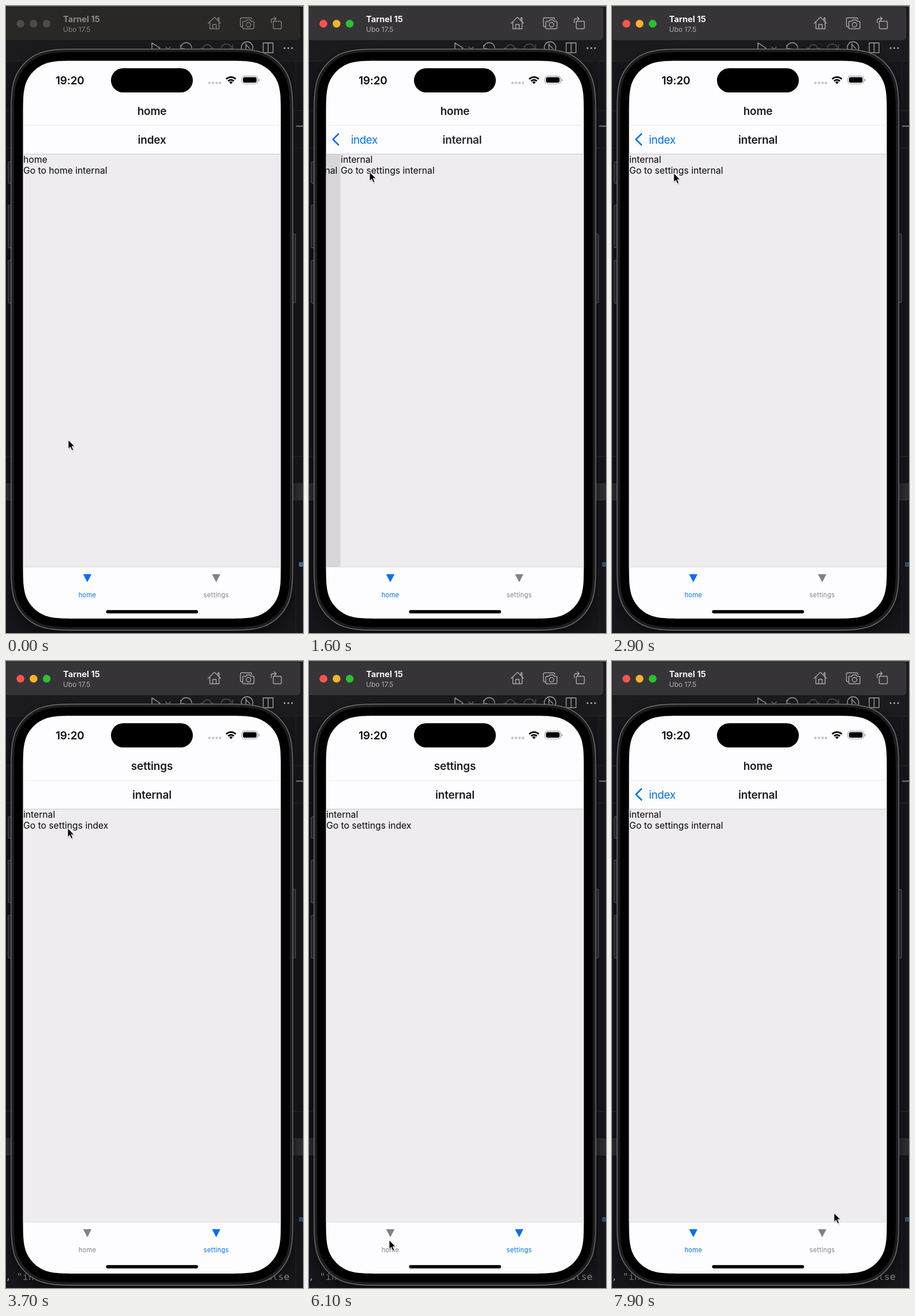
Write an HTML page that moves like this. It is 515 px wide and 1088 px high and loops after 8 s.

```html
<!DOCTYPE html>
<html lang="en">
<head>
<meta charset="utf-8">
<title>Nested tab navigation</title>
<style>
  html, body { margin: 0; width: 100%; height: 100%; overflow: hidden; background: #151417; }
  svg { display: block; width: 515px; height: 1088px; font-family: Inter, "Noto Sans", sans-serif; }
  .line { fill: none; stroke-width: 1.4; stroke-linejoin: round; stroke-linecap: round; }
  .heading { font-size: 19px; font-weight: 600; letter-spacing: -.2px; text-anchor: middle; fill: #1c1b1e; }
  .body { font-size: 15.7px; fill: #050505; }
  .tab { font-size: 11.2px; letter-spacing: .25px; text-anchor: middle; }
  .code { font: 16.5px "DejaVu Sans Mono", monospace; fill: #96949a; white-space: pre; }
</style>
</head>
<body>
<svg viewBox="0 0 515 1088">
  <defs>
    <clipPath id="screen"><path id="glass"/></clipPath>
    <clipPath id="content"><rect x="29.5" y="257" width="447" height="716"/></clipPath>
    <filter id="blur" x="-20%" y="-20%" width="140%" height="140%"><feGaussianBlur stdDeviation="12"/></filter>
  </defs>

  <!-- editor behind the phone -->
  <rect width="515" height="1088" fill="#17161a"/>
  <rect width="515" height="95" fill="#1b1a1d"/>
  <path d="M0 95.5H515M0 181.5H515M0 246.5H515M0 781.5H515" stroke="#29282b"/>
  <rect y="828" width="515" height="30" fill="#2f2e31"/>
  <path d="M502 208.5H515" stroke="#858488" stroke-width="2"/>
  <path d="M502.5 95V1088" stroke="#222124"/>
  <rect id="marker" x="508" y="965" width="7" height="8"/>
  <g id="log" class="code"><text x="-1" y="1074">, "in</text><text x="442" y="1074">false</text></g>
  <g class="line" stroke="#a3a1a5">
    <path d="M253 64V82L267 73Z M446 64H463V81H446Z M454.5 64V81"/>
    <path d="M277 71L281 75L285 71" stroke="#757377"/>
    <path d="M303 68V74H309 M303 73A9.5 9.5 0 0 1 322 73"/>
    <g stroke="#545256"><circle cx="349" cy="74" r="7"/><path d="M338 73H342M356 73H360 M373 73A9.5 9.5 0 0 1 391 72M393 67V74H387"/></g>
    <circle cx="418" cy="72" r="10"/><path d="M416 65V79M416 67L423 74"/>
  </g>
  <g fill="#b5b3b7"><circle cx="483" cy="73" r="1.5"/><circle cx="489.5" cy="73" r="1.5"/><circle cx="496" cy="73" r="1.5"/></g>
  <path id="shadow" opacity=".5" filter="url(#blur)"/>

  <!-- simulator title bar -->
  <path d="M0 0H515" stroke="#777476" stroke-width="2"/>
  <path id="bar" d="M0 1H505Q511 1 511 8V52Q511 60 503 60H0Z" stroke="#0f0e10" stroke-width=".7"/>
  <g id="lights"><circle cx="25" cy="30.7" r="6.8"/><circle cx="47.8" cy="30.7" r="6.8"/><circle cx="70.5" cy="30.7" r="6.8"/></g>
  <text id="device" x="99" y="28" font-size="14.6" font-weight="700">Tarnel 15</text>
  <text id="system" x="99" y="45" font-size="12">Ubo 17.5</text>
  <g id="barIcons" class="line">
    <path d="M350.5 30L361.5 19.5L372 30M353.5 27.5V39.5H369.5V27.5M367.5 25V20.5H369.5V27M358.5 39V32H364.5V39"/>
    <path d="M410 36H408.5Q406.5 36 406.5 34V22.5Q406.5 20.5 408.5 20.5H424Q426 20.5 426 23"/>
    <path d="M412 26.5H416L418 24H423L425 26.5H428Q430 26.5 430 28.5V37.5Q430 39.5 428 39.5H412.5Q410.5 39.5 410.5 37.5V28.5Q410.5 26.5 412 26.5Z"/>
    <circle cx="420.5" cy="32.5" r="4"/>
    <path d="M463.5 26.5H476Q477.5 26.5 477.5 28V38Q477.5 39.5 476 39.5H465Q463.5 39.5 463.5 38Z M460 29V25Q460 22 463 22H468M465.5 19L468.5 22L465.5 25"/>
  </g>

  <!-- phone body -->
  <g fill="#222124" stroke="#59585b">
    <rect x="4" y="270.5" width="8" height="37" rx="1"/>
    <rect x="4" y="345.5" width="8" height="74" rx="1"/>
    <rect x="4" y="441.5" width="8" height="74" rx="1"/>
    <rect x="493" y="396" width="9" height="119" rx="1"/>
  </g>
  <path id="shell" fill="#1d1c1f" stroke="#737276" stroke-width="1.4"/>
  <path id="bezel"/>

  <g clip-path="url(#screen)">
    <rect x="29" y="95" width="448" height="969" fill="#fdfcfe"/>
    <g clip-path="url(#content)">
      <g id="under" class="body">
        <rect x="29.5" y="257" width="447" height="716" fill="#eeecef"/>
        <text x="30" y="272">home</text><text x="30" y="291">Go to home internal</text>
      </g>
      <rect id="dim" x="29.5" y="257" width="447" height="716"/>
      <g id="over" class="body">
        <rect x="29.5" y="257" width="447" height="716" fill="#eeecef"/>
        <text x="30" y="272">internal</text><text id="link" x="30" y="291"></text>
      </g>
    </g>
    <path d="M29 207H477" stroke="#ebeaec"/>
    <path d="M29 257H477" stroke="#c5c4c7"/>
    <path d="M29 973.5H477" stroke="#dad9dc"/>

    <text id="tabTitle" class="heading" x="253" y="188.5"></text>
    <text id="oldTitle" class="heading" y="238.5">index</text>
    <text id="newTitle" class="heading" y="238.5">internal</text>
    <g id="back" fill="#0070f2">
      <path d="M51 222L41.5 231.5L51 241" fill="none" stroke="#0070f2" stroke-width="2.6" stroke-linecap="round" stroke-linejoin="round"/>
      <text id="backLabel" y="238.5" font-size="18.7" letter-spacing="-.3">index</text>
    </g>

    <!-- status bar -->
    <text x="86" y="135.5" font-size="19" font-weight="600" letter-spacing="-.2" fill="#0a0a0a">19:20</text>
    <rect x="182" y="108" width="142" height="42" rx="21"/>
    <g fill="#c6c5c8"><circle cx="352.7" cy="133.5" r="2.2"/><circle cx="358.9" cy="133.5" r="2.2"/><circle cx="365.1" cy="133.5" r="2.2"/><circle cx="371.2" cy="133.5" r="2.2"/></g>
    <g fill="none" stroke="#000" stroke-width="2.8"><path d="M381.8 126.7A11.8 11.8 0 0 1 398.4 126.7M385 130.3A7.2 7.2 0 0 1 395.2 130.3"/></g>
    <path d="M390.1 135.5L387 132.2A4.5 4.5 0 0 1 393.2 132.2Z"/>
    <rect x="409" y="121.5" width="27.5" height="13.5" rx="4.5" fill="none" stroke="#9c9b9e" stroke-width="1.2"/>
    <rect x="411" y="123.5" width="23.5" height="9.5" rx="2.7"/>
    <path d="M438 126V131Q439.8 130 439.8 128.5Q439.8 127 438 126Z" fill="#9c9b9e"/>

    <!-- tab bar -->
    <g id="homeTab" class="tab"><path d="M133.8 986H148.2L141 1000Z"/><text x="141" y="1025.5">home</text></g>
    <g id="settingsTab" class="tab"><path d="M357.3 986H371.7L364.5 1000Z"/><text x="364.5" y="1025.5">settings</text></g>
    <rect x="173.5" y="1048.3" width="159.5" height="5.6" rx="2.8"/>
  </g>

  <g id="cursor">
    <g transform="scale(.9)">
      <path d="M1 2V19.5L5 16L8 22.5L11 21.2L8.2 14.5H13.5Z" opacity=".16"/>
      <path d="M0 0V17.2L4 13.5L6.9 20.3L9.8 19L6.9 12.3H12.3Z" stroke="#fff" stroke-linejoin="round"/>
    </g>
  </g>
</svg>

<script>
const LOOP = 8000, STEP = 100;
const ACTIVATE = 1100, PUSH = 1350, TO_SETTINGS = 3100, TO_HOME = 6600;
const WIDTH = 446, CENTER = 253;

// Pointer stops: [time, x, y]
const STOPS = [
  [0, 108, 753], [1000, 105, 288], [2700, 105, 288], [2900, 107, 290], [4100, 107, 290],
  [4500, 197, 455], [4900, 313, 892], [5300, 386, 1005], [5400, 386, 1005],
  [6100, 139, 1005], [6300, 139, 1005], [6400, 138, 1004], [7500, 138, 1004], [7900, 385, 958], [8000, 385, 958],
];

const el = {};
for (const node of document.querySelectorAll("[id]")) el[node.id] = node;
const set = (id, attrs) => { for (const name in attrs) el[id].setAttribute(name, attrs[name]); };

// Rectangle whose corners have continuous curvature
function smoothRect(left, top, right, bottom, radius) {
  const corner = (x, y, sx, sy, swap) => {
    const points = [[1.529, 0], [1.088, 0], [.868, 0], [.631, .075], [.373, .169], [.169, .373], [.075, .631], [0, .868], [0, 1.088], [0, 1.529]];
    if (swap) points.reverse();
    const [start, ...curve] = points.map(([u, v]) => `${x + sx * u * radius} ${y + sy * v * radius}`);
    return `L${start}C${curve.join(" ")}`;
  };
  const outline = corner(right, top, -1, 1) + corner(right, bottom, -1, -1, true)
    + corner(left, bottom, 1, -1) + corner(left, top, 1, 1, true);
  return "M" + outline.slice(1) + "Z";
}

// Zero at the ends of a rest, otherwise the slope between the neighbours
function slope(i, axis) {
  const before = STOPS[i - 1], here = STOPS[i], after = STOPS[i + 1];
  if (!before || !after || before[axis] === here[axis] || after[axis] === here[axis]) return 0;
  return (after[axis] - before[axis]) / (after[0] - before[0]);
}

function pointer(t, axis) {
  const i = STOPS.findIndex((stop, k) => t < STOPS[k + 1][0]);
  const a = STOPS[i], b = STOPS[i + 1], span = b[0] - a[0];
  const u = (t - a[0]) / span, v = 1 - u;
  return a[axis] * v * v * (1 + 2 * u) + b[axis] * u * u * (1 + 2 * v)
    + span * u * v * (slope(i, axis) * v - slope(i + 1, axis) * u);
}

// Remaining part of the push: a critically damped spring
function remaining(t) {
  if (t < PUSH) return 1;
  const x = 18.4 * (t - PUSH) / 1000;
  return x > 9 ? 0 : (1 + x) * Math.exp(-x);
}

function drawTitleBar(active) {
  set("bar", { fill: active ? "#363437" : "#292826" });
  set("device", { fill: active ? "#f5f4f5" : "#8b8988" });
  set("system", { fill: active ? "#b0aeb1" : "#858382" });
  set("barIcons", { stroke: active ? "#aaa8ab" : "#807e7d" });
  ["#fe544d", "#f8b32c", "#28c131"].forEach((color, i) =>
    el.lights.children[i].setAttribute("fill", active ? color : "#4c4b49"));
  set("marker", { fill: active ? "#23586d" : "#3d77a8" });
}

function drawApp(t) {
  const settings = t >= TO_SETTINGS && t < TO_HOME;
  const rest = settings ? 0 : remaining(t), done = 1 - rest;

  set("under", { transform: `translate(${-0.3 * WIDTH * done} 0)` });
  set("dim", { opacity: 0.1 * done });
  set("over", { transform: `translate(${WIDTH * rest} 0)`, visibility: rest < 1 ? "visible" : "hidden" });
  el.link.textContent = settings ? "Go to settings index" : "Go to settings internal";

  el.tabTitle.textContent = settings ? "settings" : "home";
  set("oldTitle", { x: CENTER - 165 * done, opacity: Math.max(0, 1 - 2 * done) });
  set("newTitle", { x: CENTER + WIDTH / 2 * rest, opacity: done });
  set("back", { opacity: settings ? 0 : Math.min(1, Math.max(0, 2.5 * done - 1)) });
  set("backLabel", { x: 64 + 155 * rest });

  set("homeTab", { fill: settings ? "#828184" : "#0070f2" });
  set("settingsTab", { fill: settings ? "#0070f2" : "#828184" });
}

function frame(now) {
  const t = Math.floor(now % LOOP / STEP) * STEP;
  drawTitleBar(t >= ACTIVATE);
  drawApp(t);
  set("log", { opacity: t >= TO_SETTINGS ? 1 : 0 });
  set("cursor", { transform: `translate(${pointer(t, 1)} ${pointer(t, 2)})` });
  requestAnimationFrame(frame);
}

set("glass", { d: smoothRect(29.5, 95, 476.5, 1063, 62.5) });
set("bezel", { d: smoothRect(14, 80, 492, 1078, 77) });
set("shell", { d: smoothRect(8.8, 74.8, 497.2, 1083.3, 82) });
set("shadow", { d: smoothRect(8.8, 84, 497.2, 1094, 82) });
frame(performance.now());
</script>
</body>
</html>
```
